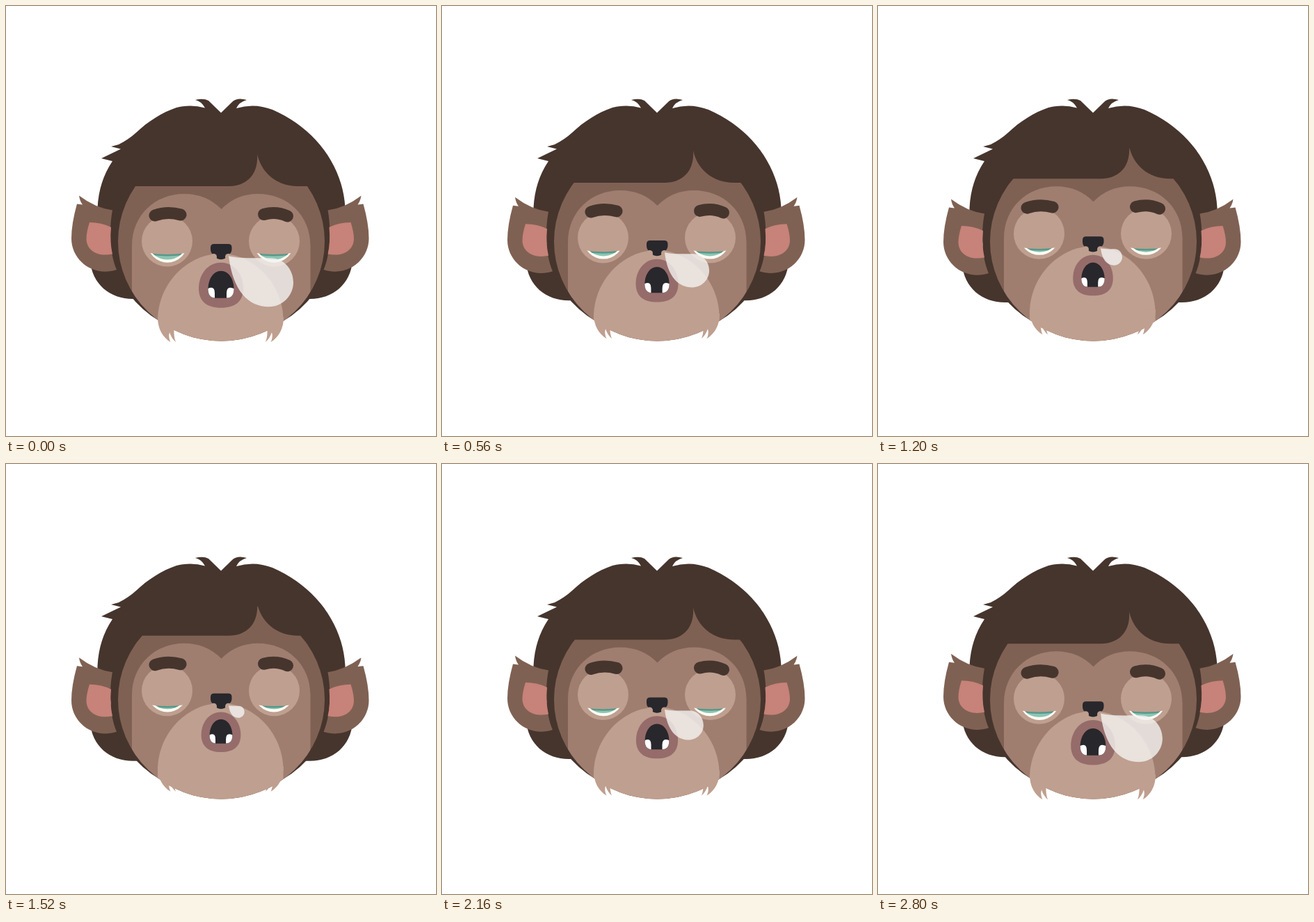
Write an HTML page that moves like this. It is 618 px wide and 618 px high and loops after 2880 ms.

```html
<!DOCTYPE html>
<html lang="en">
<head>
<meta charset="utf-8">
<title>Sleeping monkey</title>
<style>
  html, body { margin: 0; width: 100%; height: 100%; overflow: hidden; background: #fff; }
  svg { display: block; width: 100vw; height: 100vh; }
  .hair { fill: #46352d; }
  .skin { fill: #7f6153; }
  .cheek { fill: #9f7e70; }
  .muzzle { fill: #bf9f8f; }
  .ink { fill: #28272c; }
  .brow { fill: none; stroke: #46352d; stroke-width: 17; stroke-linecap: round; }
</style>
</head>
<body>
<svg viewBox="0 0 618 618">
  <defs>
    <clipPath id="head"><ellipse cx="309.5" cy="338.5" rx="148.5" ry="143"/></clipPath>
    <clipPath id="iris"><ellipse cx="232" cy="347" rx="24" ry="17.5"/></clipPath>
    <clipPath id="gape"><path id="gapePath" d="M0 12C11 12 18.5 24 18.5 38C18.5 46 15 51 8 51H-8C-15 51 -18.5 46 -18.5 38C-18.5 24 -11 12 0 12Z"/></clipPath>
  </defs>

  <!-- Hair and ears -->
  <path class="hair" d="M131.500 290C133 262 141 241 153 223L137 219L165 205.500L151 202L162 199Q176 192 187 182C204 166 224 153 245 146Q266 141 286 146.500Q281 137 272 135Q284 132 291 136L309 153.500L326 137Q333 131 346 135Q335 138 331 147Q357 139 383 149C443 175 484 228 487.500 290V300L478 340H140L131.500 300Z"/>
  <g data-move="ears">
    <g id="lock"><path class="hair" d="M121 365C123 400 150 421 182 421H309V340H130Z"/></g>
    <use href="#lock" transform="translate(619) scale(-1 1)"/>
  </g>
  <ellipse class="hair" cx="309.500" cy="335" rx="159.500" ry="142"/>
  <g data-move="ears">
    <g id="ear">
      <path class="skin" d="M153 293.500Q128 290 105 272.500Q106 280 110 285.500L102 284.500Q94 313 94 334C94 366 126 390 159 379C149 356 148 320 153 293.500Z"/>
      <path fill="#c78279" d="M120 311Q115.500 325 115.500 335C116 351 131 361 153 356.500Q149 340 151 318Q137 311 120 311Z"/>
    </g>
    <use href="#ear" transform="translate(615.500) scale(-1 1)"/>
  </g>

  <!-- Skin, cut to the head shape -->
  <g clip-path="url(#head)">
    <g data-move="face">
      <path class="skin" d="M100 259H320C346 259 363 242 361 213C367 239 388 259 420 259H520V520H100Z"/>
      <path class="cheek" d="M181 345C181 300 215 270 256 270Q288 270 309.500 292Q331 270 362 270C404 270 437.500 300 437.500 345V520H181Z"/>
      <path class="muzzle" d="M218 452C218 400 260 356 308.500 356S398.500 400 398.500 452V520H218Z"/>
    </g>
  </g>

  <g data-move="face">
    <g id="tuft"><path class="muzzle" d="M218 447C218 464 225 476 236.500 483Q233 476 235 469Q238 478 244 483Q241 476 241.500 464L240 447Z"/></g>
    <use href="#tuft" transform="translate(617) scale(-1 1)"/>

    <g id="eye">
      <circle class="muzzle" cx="231.500" cy="338" r="36.500"/>
      <path fill="#fffdf5" d="M203.300 340A28.700 28.700 0 0 0 260.700 340Z"/>
      <g clip-path="url(#iris)">
        <rect x="200" y="325" width="64" height="45" fill="#8cc5b3"/>
        <path data-move="lid" d="M203 354.500Q232 359.500 261 354.500" fill="none" stroke="#58988a" stroke-width="5"/>
      </g>
      <path data-move="lid" class="muzzle" d="M203 354.500Q232 359.500 261 354.500V322H203Z"/>
    </g>
    <use href="#eye" transform="translate(617) scale(-1 1)"/>
    <path class="brow" d="M214 301Q232 294.500 251 300"/>
    <path class="brow" d="M370.500 299.500Q388 294.500 404.500 302"/>

    <path class="ink" d="M299 342H319.500Q324.500 342 324.500 347V350Q324 357 317 358Q316 363 313 363.500Q309 365 305 363.500Q302 363 301 358Q294 357 294 350V347Q294 342 299 342Z"/>
    <circle class="muzzle" cx="298.500" cy="360.500" r="4.500"/>
    <circle class="muzzle" cx="319.500" cy="360.500" r="4.500"/>
  </g>

  <g data-move="mouth">
    <path fill="#956c6a" d="M0 0C19 0 32 17 32 37C32 56 20 65 0 65S-32 56 -32 37C-32 17 -19 0 0 0Z"/>
    <use class="ink" href="#gapePath"/>
    <g clip-path="url(#gape)" fill="#fff">
      <path d="M-20 38Q-9 32 -9 44V52H-20Z"/>
      <path d="M20 38Q8 32 8 44V52H20Z"/>
    </g>
  </g>
  <path data-move="bubble" fill="#f4f3f2" fill-opacity=".8" d="M0 0C14 4 40 3 60 3C80 3 93 20 93 38C93 57 77 73 58 73C28 73 6 50 0 0Z"/>
</svg>
<script>
  const LOOP = 2880, STEP = 80;
  const RISE = -13; // face travel over half a breath

  const moves = {
    face: p => `translate(0 ${RISE * p})`,
    ears: p => `translate(0 ${6 * p})`,
    lid: p => `translate(0 ${3.5 * p})`,
    mouth: p => `translate(309 ${368.7 + RISE * p}) scale(${1 - 0.12 * p})`,
    bubble: p => `translate(320 ${359.2 + RISE * p}) scale(${1 - 0.8 * p})`
  };
  const parts = [...document.querySelectorAll('[data-move]')];

  function draw(time) {
    const t = Math.floor((time % LOOP) / STEP) * STEP;
    const p = 1 - Math.abs(1 - 2 * t / LOOP);
    for (const el of parts) el.setAttribute('transform', moves[el.dataset.move](p));
  }

  const start = performance.now();
  function tick(now) {
    draw(Math.max(0, now - start));
    requestAnimationFrame(tick);
  }
  draw(0);
  requestAnimationFrame(tick);
</script>
</body>
</html>
```
